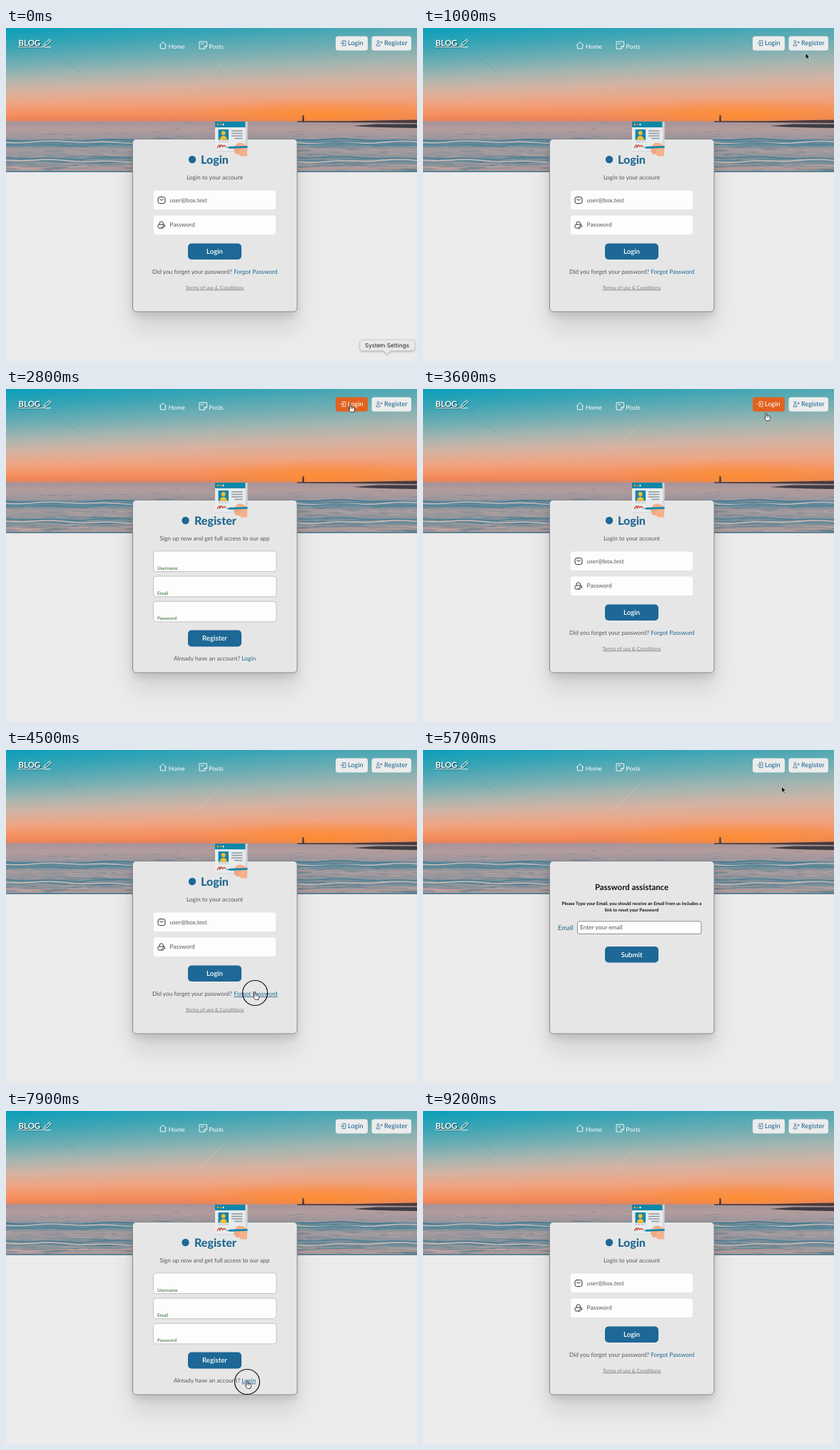
Recreate the animation shown at these times as an HTML page with a canvas. Size 576 px wide and 466 px high, loop 9.8 s.

```html
<!DOCTYPE html>
<html lang="en">
<head>
<meta charset="utf-8">
<title>Blog sign-in</title>
<style>
  html, body { margin: 0; width: 100%; height: 100%; overflow: hidden; background: #ececec; }
  canvas, svg { position: absolute; left: 0; top: 0; display: block; }
  text { font-family: Lato, sans-serif; font-size: 8.4px; fill: #55585c; text-rendering: geometricPrecision; white-space: pre; }
  .mid { text-anchor: middle; }
  .bold { font-weight: 700; }
  .blue, .link { fill: #1d6790; }
  .title { font-size: 16px; font-weight: 800; fill: #1d6790; }
  .cta { font-size: 9.7px; font-weight: 600; fill: #fff; text-anchor: middle; }
  .nav text { font-size: 8.7px; fill: #fff; }
  .nav .brand { font-size: 11.4px; text-shadow: .8px 1px 1px #000a; }
  .nav path { fill: none; stroke: #fff; stroke-width: .9; }
  .tag { font-size: 6.35px; font-weight: 700; fill: #5d8a60; }
  .note { font-size: 6.3px; font-weight: 700; fill: #111; text-anchor: middle; }
  .card { fill: #e6e6e7; stroke: #858789; filter: drop-shadow(0 6px 6px #0000001c) drop-shadow(0 22px 16px #0000001c); }
  .primary { fill: #1d6896; }
  .line { fill: none; stroke: #333; stroke-width: 1; stroke-linecap: round; stroke-linejoin: round; }
  .btn rect { fill: #ececec; }
  .btn text { font-size: 9.1px; font-weight: 500; fill: #1d6790; }
  .btn path { fill: none; stroke: #1d6790; stroke-width: .75; stroke-linecap: round; stroke-linejoin: round; }
  .btn.on rect { fill: #e2611f; }
  .btn.on text { fill: #fff; }
  .btn.on path { stroke: #fff; }
  .link.on { text-decoration: underline; }
  .off { display: none; }
</style>
</head>
<body>
<canvas id="photo" width="576" height="202"></canvas>
<svg width="576" height="466" viewBox="0 0 576 466">
  <g class="nav">
    <text class="brand bold" x="17.5" y="25">BLOG</text>
    <path d="M17.5 27.6H54" style="stroke:#0006"/>
    <path d="M17 26.7H63"/>
    <path d="M53 25.4l1-3.6 7.200-6.300 2.300 2.500-7.200 6.300zM54.600 22l2 2.300M59.500 17l2.300 2.500" style="stroke:#0007" transform="translate(.7 .8)"/>
    <path d="M53 25.4l1-3.600 7.200-6.300 2.300 2.500-7.200 6.300zM54.600 22l2 2.300M59.500 17l2.300 2.500"/>
    <path d="M215 24.200l5-4.700 5 4.700M216.400 23.200v5.600h7.200v-5.600"/>
    <path d="M271 19h10.500v6.800l-3.400 3.400H271zM281.500 25.500h-3.600v3.500M273 22h4"/>
    <text x="227.800" y="28.600">Home</text>
    <text x="284.300" y="28.600">Posts</text>
  </g>
  <g class="btn" id="loginBtn">
    <rect x="462" y="11.5" width="45" height="20" rx="3.5"/>
    <path d="M471.300 19v-1.200h4.700v6.800h-4.700v-1.200M469 21.200h4.600M472 19.600l1.600 1.600-1.600 1.600"/>
    <text x="479" y="24.400">Login</text>
  </g>
  <g class="btn" id="registerBtn">
    <rect x="512.500" y="11.500" width="55.500" height="20" rx="3.500"/>
    <path d="M519 24.500c0-4 5-4 5 0zM521.500 17.600a1.500 1.500 0 1 1-.01 0M525 20h2.400M526.200 18.800v2.400"/>
    <text x="530" y="24.400">Register</text>
  </g>

  <rect class="card" x="177.500" y="155.500" width="230.500" height="241.500" rx="5"/>

  <g id="badge">
    <rect x="293" y="131" width="45.500" height="42" fill="#d3d6d9"/>
    <rect x="293" y="131" width="42.500" height="41" fill="#e9ebec"/>
    <rect x="293" y="131" width="42.500" height="8" fill="#0d87a9"/>
    <circle cx="297" cy="135" r="1.200" fill="#f0b429"/>
    <circle cx="300.700" cy="135" r="1.200" fill="#e8743b"/>
    <circle cx="304.400" cy="135" r="1.200" fill="#e9ebec"/>
    <rect x="297.500" y="142" width="14.500" height="14.500" fill="#1585ab"/>
    <circle cx="304.700" cy="147" r="2.900" fill="#f3bd2e"/>
    <path d="M299.800 156.500c0-7.500 9.800-7.500 9.800 0z" fill="#f3bd2e"/>
    <path d="M316 144h15.500M316 147.500h15.500M316 151h15.500M320 154.500h11.500" stroke="#8d979f" stroke-width="1.400"/>
    <path d="M298 159h14" stroke="#a9b0b5" stroke-width="1.200" stroke-dasharray="3 1"/>
    <path d="M296 168c2-4 4-6 3.500-2s2-4 3-2 1 3 2.500 1 2 2 4 1" fill="none" stroke="#c8452e" stroke-width="1.300"/>
    <path d="M318.500 168l5-6.500q6-2.500 11 1l3.500 4v13h-8.500l-3-2.500h-4l-2.500-3.500z" fill="#f4b18c"/>
    <path d="M320 171h7M321 174h6" stroke="#dc9270" stroke-width=".8"/>
    <path d="M309 167.500l5-1.800 24.500-.7v2.800l-24.500 1z" fill="#1585ab"/>
  </g>

  <g id="login">
    <circle class="primary" cx="261" cy="184" r="5.200"/>
    <text class="title" x="273" y="189.800">Login</text>
    <text class="mid" x="292.500" y="212">Login to your account</text>
    <g fill="#fdfdfd" stroke="#dedede" stroke-width=".6">
      <rect x="206.500" y="227" width="172" height="27.500" rx="3.500"/>
      <rect x="206.500" y="262" width="172" height="27.500" rx="3.500"/>
    </g>
    <rect class="line" x="213" y="236.500" width="10" height="9" rx="2.500"/>
    <path class="line" d="M215.500 239.300l2.500 2 2.500-2"/>
    <path class="line" d="M217 280h-2.500q-1.500 0-1.500-1.500v-2q0-1.500 1.500-1.500h7.500M215 275v-1.500a2.700 2.700 0 0 1 5.400 0v1.500M218 280.500l.5-2 3.500-2.500 1 1.300-3.500 2.700z"/>
    <text x="229.500" y="243.500">user@box.test</text>
    <text x="229.500" y="278.300">Password</text>
    <rect class="primary" x="255" y="301.500" width="75" height="22.500" rx="5"/>
    <text class="cta" x="292.500" y="316.200">Login</text>
    <text class="mid" x="292.700" y="344">Did you forget your password? <tspan class="link" id="forgotLink">Forgot Password</tspan></text>
    <text class="mid" x="292.500" y="365.500" style="font-size:7.100px;fill:#7b7d80;text-decoration:underline">Terms of use &amp; Conditions</text>
  </g>

  <g id="register">
    <circle class="primary" cx="251.500" cy="184" r="5.200"/>
    <text class="title" x="264" y="189.800">Register</text>
    <text class="mid" x="292.500" y="212">Sign up now and get full access to our app</text>
    <g fill="#fdfdfd" stroke="#bcc0bd" stroke-width=".9">
      <rect x="206.500" y="226.800" width="172.500" height="28.700" rx="4"/>
      <rect x="206.500" y="262" width="172.500" height="28.700" rx="4"/>
      <rect x="206.500" y="297.200" width="172.500" height="28.700" rx="4"/>
    </g>
    <text class="tag" x="212" y="252.700">Username</text>
    <text class="tag" x="212" y="287.900">Email</text>
    <text class="tag" x="212" y="323.100">Password</text>
    <rect class="primary" x="255" y="337.500" width="75" height="23" rx="5"/>
    <text class="cta" x="292.500" y="352.400">Register</text>
    <text class="mid" x="292.500" y="380.300">Already have an account? <tspan class="link" id="backLink">Login</tspan></text>
  </g>

  <g id="reset">
    <text class="mid bold" x="292.500" y="195.500" style="font-size:11.400px;fill:#111">Password assistance</text>
    <text class="note" x="292.500" y="217.300">Please Type your Email, you should receive an Email from us includes a</text>
    <text class="note" x="292.500" y="225.800">link to reset your Password</text>
    <text class="blue" x="189" y="251.500" style="font-size:9.200px">Email</text>
    <rect x="216.500" y="239.800" width="173.500" height="17.500" rx="2.500" fill="#fdfdfd" stroke="#7c8085" stroke-width=".9"/>
    <text x="220" y="251.400">Enter your email</text>
    <rect class="primary" x="255" y="275" width="75" height="22.500" rx="5"/>
    <text class="cta" x="292.500" y="289.700">Submit</text>
  </g>

  <g id="tip" style="filter:drop-shadow(0 1px 1.500px #0004)">
    <path d="M500 436.500h69q4 0 4 4v7q0 4-4 4h-30l-5 5-5-5h-29q-4 0-4-4v-7q0-4 4-4z" fill="#e9e9e9" stroke="#c9c9c9" stroke-width=".6"/>
    <text class="mid" x="534" y="447" style="font-family:Inter,sans-serif;font-size:8.100px;fill:#222">System Settings</text>
  </g>

  <g id="cursor">
    <circle id="ring" cx="0" cy="1.500" r="17.500" fill="none" stroke="#111" stroke-width="1.200"/>
    <path id="arrow" d="M0 0v8.500l2-1.800 1.400 3 1.500-.7-1.400-2.900h2.600z" fill="#111" stroke="#fff" stroke-width=".6"/>
    <path id="hand" d="M-1 .8q1-1.200 1.900 0v3.200q2.400-.6 4 .8 1.200.8.600 3.200l-.9 2.800h-4.200l-3.200-3.800q.2-1.400 1.800-.2zM1.300 5.200v1.300M3 5.400v1.300" fill="#fff" stroke="#111" stroke-width=".8" stroke-linejoin="round"/>
    <path id="beam" d="M-2-4.500q2 0 2 1.200v6.600q0 1.200-2 1.200M2-4.500q-2 0-2 1.200v6.600q0 1.200 2 1.200" fill="none" stroke="#222" stroke-width=".9"/>
  </g>
</svg>
<script>
const $ = id => document.getElementById(id);
const LOOP = 9800, STEP = 100;

function paintPhoto() {
  const W = 576, HORIZON = 131;
  const c = $('photo').getContext('2d');
  let seed = 11;
  const rnd = () => (seed = seed * 16807 % 2147483647) / 2147483647;
  const gradient = (x, y, w, y0, y1, stops) => {
    const g = c.createLinearGradient(0, y0, 0, y1);
    stops.forEach(([at, color]) => g.addColorStop(at, color));
    c.fillStyle = g;
    c.fillRect(x, y, w, y1 - y);
  };
  const poly = (color, ...p) => {
    c.fillStyle = color;
    c.beginPath();
    for (let i = 0; i < p.length; i += 2) c.lineTo(p[i], p[i + 1]);
    c.fill();
  };
  const trail = (x1, y1, x2, y2, color, w) => {
    c.strokeStyle = color;
    c.lineWidth = w;
    c.beginPath();
    c.moveTo(x1, y1);
    c.lineTo(x2, y2);
    c.stroke();
  };

  // The warm light climbs higher towards the right.
  const sky = [
    [0, '#0c9fba'], [.2, '#3ba5b5'], [.38, '#72aeb3'], [.52, '#a5b5b0'], [.66, '#d3b3a3'],
    [.8, '#ee a583'.replace(' ', '')], [.92, '#f6905f'], [.97, '#ee8658'], [1, '#cf8873']];
  for (let x = 0; x < W; x += 2) gradient(x, 0, 2, 2 - 50 * x / W, HORIZON, sky);
  c.save();
  c.translate(440, 122);
  c.scale(1, .12);
  const glow = c.createRadialGradient(0, 0, 0, 0, 0, 190);
  glow.addColorStop(0, 'rgba(255,142,44,.8)');
  glow.addColorStop(1, 'rgba(255,142,44,0)');
  c.fillStyle = glow;
  c.fillRect(-200, -200, 400, 270);
  c.restore();

  trail(302, 50, 262, 90, 'rgba(240,190,175,.3)', 1.4);
  trail(28, 0, 104, 62, 'rgba(40,120,140,.14)', 1.2);

  gradient(0, HORIZON, W, HORIZON, 202, [
    [0, '#a5949a'], [.15, '#b39c9c'], [.33, '#9c969d'], [.4, '#5d8797'], [.47, '#6f8d99'],
    [.55, '#a79b9e'], [.7, '#8d949b'], [.78, '#678998'], [.88, '#a2989b'], [1, '#b89b95']]);
  for (let i = 0; i < 420; i++) {
    const d = Math.sqrt(rnd()), x = rnd() * 600 - 12, y = 132 + d * 67;
    c.fillStyle = rnd() < .5 ? 'rgba(50,108,132,.28)' : 'rgba(222,184,172,.28)';
    c.beginPath();
    c.ellipse(x, y, 4 + rnd() * 24 * d, .4 + d * rnd() * .8, 0, 0, 7);
    c.fill();
  }
  for (const [y, color] of [[157, '#397a92'], [160, '#c9bdbd'], [163, '#4d8398'], [182, '#457d93'], [186, '#cfbcb7']]) {
    c.strokeStyle = color;
    c.lineWidth = 1.5;
    c.beginPath();
    for (let x = 0; x <= W; x += 6) c.lineTo(x, y + 1.3 * Math.sin(x / 41 + y) + .8 * Math.sin(x / 13));
    c.stroke();
  }

  poly('#4a3a3c', 408, 130.3, 480, 130.3, 545, 129, 576, 128.5, 576, 133, 500, 132.3, 408, 131.8);
  poly('#3f3c43', 486, 137, 520, 134.5, 576, 134.5, 576, 140, 545, 139.5, 510, 138.5);
  poly('#4a3a3c', 415, 131, 415.6, 122, 417.4, 122, 418, 131);
  c.fillStyle = '#2f7fa5';
  c.fillRect(0, 200, W, 1.3);
}

// [time, x, y, pointer]
const path = [
  [0, 534, 446, ''], [100, 534, 446, 'arrow'], [1000, 536, 35, 'arrow'], [1100, 537, 21, 'hand'],
  [2000, 537, 21, 'hand'], [2600, 483, 21, 'hand'], [3500, 482, 25, 'hand'],
  [3600, 481, 33.5, 'hand'], [3700, 474, 52, 'arrow'], [4400, 349, 338.5, 'hand'],
  [4600, 349, 338.5, 'arrow'], [5000, 349, 338.5, 'arrow'], [5700, 502.5, 51, 'arrow'],
  [5900, 519, 35, 'arrow'], [6000, 536, 22, 'hand'], [6300, 536, 22, 'hand'],
  [6500, 500, 55, 'arrow'], [7000, 280, 321, 'beam'], [7100, 277, 325, 'beam'],
  [7300, 277, 325, 'arrow'], [7700, 338, 377.5, 'hand'], [8100, 338, 377.5, 'arrow'],
  [8200, 338, 379, 'arrow'], [8500, 359, 406, 'arrow'], [8700, 359, 406, ''], [LOOP, 359, 406, '']
];
const pages = [[0, 'login'], [1400, 'register'], [2900, 'login'], [4600, 'reset'], [6300, 'register'], [8100, 'login']];
const clicks = [[1200, 1400], [2600, 2800], [4400, 4600], [6100, 6300], [7800, 8100]];
const hovers = {
  registerBtn: [[1100, 2200], [6000, 6500]],
  loginBtn: [[2400, 3700]],
  forgotLink: [[4400, 4600]],
  backLink: [[7700, 8100]]
};

const within = (spans, t) => spans.some(([a, b]) => t >= a && t < b);
const show = (id, on) => $(id).classList.toggle('off', !on);
const ease = k => k * k * (3 - 2 * k);

function render(t) {
  const page = pages.findLast(p => t >= p[0])[1];
  for (const id of ['login', 'register', 'reset']) show(id, id === page);
  show('badge', page !== 'reset');
  show('tip', t < 100);
  for (const id in hovers) $(id).classList.toggle('on', within(hovers[id], t));

  const i = path.findLastIndex(p => t >= p[0]);
  const [t0, x0, y0, pointer] = path[i], [t1, x1, y1] = path[i + 1];
  const k = ease((t - t0) / (t1 - t0));
  $('cursor').setAttribute('transform', `translate(${x0 + (x1 - x0) * k} ${y0 + (y1 - y0) * k})`);
  for (const id of ['arrow', 'hand', 'beam']) show(id, id === pointer);
  show('ring', within(clicks, t));
}

paintPhoto();
const start = performance.now();
function tick() {
  const t = (performance.now() - start) % LOOP;
  render(Math.floor(t / STEP) * STEP);
  requestAnimationFrame(tick);
}
tick();
</script>
</body>
</html>
```
